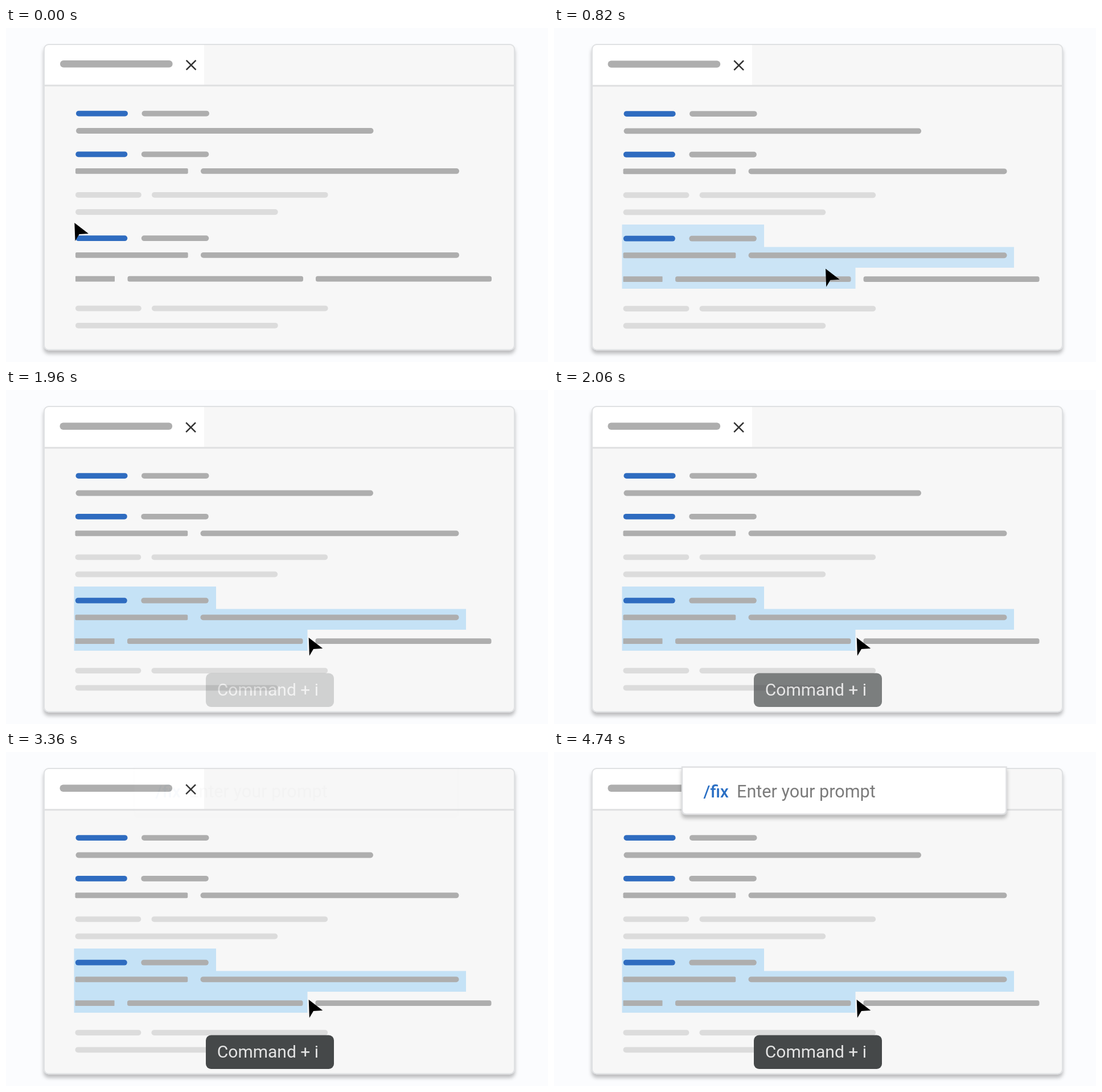
An HTML page for the animation above (4780 ms loop, 952x588 px).

```html
<!DOCTYPE html>
<html lang="en">
<head>
<meta charset="utf-8">
<title>Inline prompt</title>
<style>
  html, body { margin: 0; width: 100%; height: 100%; overflow: hidden; background: #fbfcfe; }
  svg { display: block; }
  text { font: 30px Roboto, sans-serif; }
  .raised { filter: drop-shadow(0 6px 3px rgba(0, 0, 0, .25)); }
  .blue { fill: #2f6cc0; }
  .grey { fill: #aeaeae; }
  .pale { fill: #dcdcdc; }
</style>
</head>
<body>
<svg width="952" height="588" viewBox="0 0 952 588">
  <rect class="raised" x="66" y="28" width="828" height="539.5" rx="9" fill="#f7f7f7"/>
  <path d="M67 101V37q0-8 8-8H348V101z" fill="#fff"/>
  <path id="rule" d="M67 101.2H893" stroke="#dfe0e1" stroke-width="3"/>
  <rect x="67" y="29" width="826" height="537.5" rx="8" fill="none" stroke="#dfe1e3" stroke-width="2"/>
  <path id="selection" d="M119.5 346H369V385.5H808V422H529.5V459H119.5z" fill="#c5e2f6"/>
  <g id="content">
    <path d="M316.7 56.9l16.8 16.8m0-16.8l-16.8 16.8" stroke="#333" stroke-width="2.6"/>
  </g>
  <g id="shortcut">
    <rect x="351" y="498.5" width="225" height="59.5" rx="9" fill="#454849"/>
    <text x="370.8" y="538" fill="#e4e4e4">Command + i</text>
  </g>
  <path id="cursor" d="M0 0L24.6 19L8.3 20L1.2 32z"/>
  <g id="prompt">
    <path class="raised" d="M225 26.5H794.5V102q0 7.5-7.5 7.5H232.5q-7.5 0-7.5-7.5z"
          fill="#fff" stroke="#dfe0e2" stroke-width="2.5"/>
    <text x="262.5" y="79.5" fill="#2a6fc4" font-weight="500" style="font-weight:500">/fix</text>
    <text x="321" y="79.5" fill="#7b7b7b" style="font-size:30.6px">Enter your prompt</text>
  </g>
</svg>
<script>
const LOOP = 4780, STEP = 20;
const $ = id => document.getElementById(id);

function bar(kind, y, left, right, radius = 4.8, height = 9.8) {
  const rect = document.createElementNS('http://www.w3.org/2000/svg', 'rect');
  const attrs = { class: kind, x: left, y, width: right - left, height, rx: radius };
  for (const name in attrs) rect.setAttribute(name, attrs[name]);
  $('content').append(rect);
}

function heading(y, x) {
  bar('blue', y, x, x + 91);
  bar('grey', y, x + 115.5, x + 234);
}

function splitLine(y) {
  bar('grey', y, 122, 319.7, 2);
  bar('grey', y, 342, 796);
}

function paleLines(y) {
  bar('pale', y, 122, 237.8);
  bar('pale', y, 256, 565.6);
  bar('pale', y + 30.2, 122, 477.7);
}

bar('grey', 57, 95, 292.6, 6, 12.4);
heading(145.7, 123);
bar('grey', 176.1, 123, 645.5);
heading(217.4, 122.3);
splitLine(247);
paleLines(288.9);
heading(365.3, 122.3);
splitLine(394.9);
bar('grey', 436.8, 122, 191, .8);
bar('grey', 436.8, 213.5, 522, 3.5);
bar('grey', 436.8, 544, 853, 3.5);
paleLines(488.7);

// cubic-bezier(0, 0, .58, 1), solved by bisection
function easeOut(x) {
  if (x <= 0) return 0;
  if (x >= 1) return 1;
  let low = 0, high = 1;
  for (let i = 0; i < 24; i++) {
    const u = (low + high) / 2;
    if (1.74 * (1 - u) * u * u + u ** 3 < x) low = u; else high = u;
  }
  return low * low * (3 - 2 * low);
}

const phase = (time, start, duration) => easeOut((time - start) / duration);

function draw(now) {
  const time = Math.floor(now % LOOP / STEP) * STEP;
  const drag = phase(time, 500, 460);
  $('cursor').setAttribute('transform', `translate(${120.3 + 411.4 * drag} ${343 + 93 * drag})`);
  $('content').setAttribute('transform', `translate(${-.5 * drag} ${.5 * drag})`);
  $('rule').setAttribute('transform', `translate(0 ${.5 * drag})`);
  $('selection').setAttribute('opacity', drag);
  $('shortcut').setAttribute('opacity', phase(time, 1924, 270));
  $('prompt').setAttribute('opacity', phase(time, 3350, 640));
}

let begin;
function tick(now) {
  begin ??= now;
  draw(now - begin);
  requestAnimationFrame(tick);
}
draw(0);
requestAnimationFrame(tick);
</script>
</body>
</html>
```
